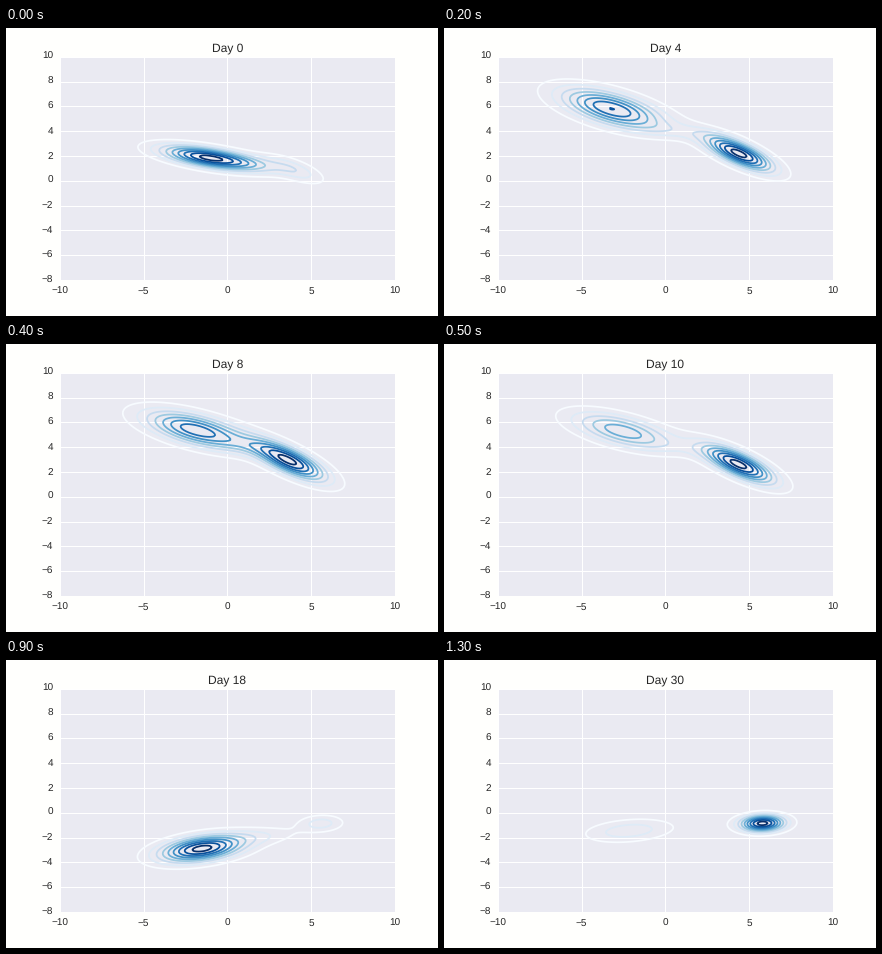
A matplotlib script for the animation above (1400 ms loop, 432 by 288 pixels).

```python
import matplotlib.pyplot as plt
import numpy as np
from matplotlib.animation import FuncAnimation

plt.rcParams.update({
    "font.family": "Liberation Sans",
    "text.color": "0.15",
    "text.hinting": "none",
    "xtick.labelcolor": "0.15",
    "ytick.labelcolor": "0.15",
    "ytick.alignment": "center",
})

INTERVAL = 100
DAYS = [*range(0, 24, 2), 26, 30]
LEVELS = np.linspace(0.105, 0.95, 9)

# Key poses: where the two clouds are, and how high east stands against west
KEY_STEPS = [0, 2, 4, 7, 9, 11, 13]
WEST_PATH = [(-1.1, 1.85), (-3.2, 5.8), (-1.9, 5.4), (-3.9, 5.1),
             (-1.55, -2.9), (-2.65, -2.9), (-2.2, -1.45)]
EAST_PATH = [(4.0, 0.9), (4.4, 2.2), (3.7, 2.9), (5.75, 2.05),
             (5.6, -0.85), (5.6, -1.4), (5.8, -0.85)]
BALANCE = [0.27, 1.18, 1.2, 3.2, 0.26, 0.42, 3.6]

X, Y = np.meshgrid(np.linspace(-10, 10, 180), np.linspace(-8, 10, 180))


def along(step, path):
    return np.array([np.interp(step, KEY_STEPS, axis) for axis in zip(*path)])


def tilt(y):
    """Clouds lean down to the right above zero and up to the right below."""
    return -0.1 - 0.5 * np.tanh(y + 0.5)


def bump(center, width, height, rho):
    u, v = (X - center[0]) / width, (Y - center[1]) / height
    q = (u * u - 2 * rho * u * v + v * v) / (1 - rho * rho)
    return 0.85 * np.exp(-q / 2) + 0.15 * np.exp(-q / 4)


def density(step):
    west, east = along(step, WEST_PATH), along(step, EAST_PATH)
    ratio = np.exp(np.interp(step, KEY_STEPS, np.log(BALANCE)))
    west_peak, east_peak = min(1, 1 / ratio), min(1, ratio)

    # Spreads follow the height of each cloud in the plane
    wx, wy = west
    ex, ey = east
    total = west_peak * bump(west, 1.8 + 0.04 * wx * 0 + 0.04 * wy,
                             0.6 + 0.015 * wy ** 2, tilt(wy))
    total += east_peak * bump(east, 1.03 + 0.15 * ey,
                              0.6 + 0.17 * ey, 1.25 * tilt(ey))

    # A faint bridge joins the clouds while the western one is strong
    middle = (west + east) / 2
    total += 0.15 * west_peak ** 2 * bump(middle, (ex - wx) / 4.5, 0.5, tilt(middle[1]))
    return total / total.max()


fig = plt.figure(figsize=(6, 4), dpi=72, facecolor="#FFFFFD")
ax = fig.add_axes([0.125, 0.125, 0.775, 0.775], facecolor="#EAEAF2")
ax.set(xlim=(-10, 10), ylim=(-8, 10),
       xticks=range(-10, 11, 5), yticks=range(-8, 11, 2))
ax.set_axisbelow(True)
ax.grid(color="white", linewidth=1)
ax.tick_params(length=0, pad=7, labelsize=10)
ax.spines[:].set_visible(False)
title = ax.set_title("", fontsize=12, pad=5)


def draw(step):
    for old in list(ax.collections):
        old.remove()
    ax.contour(X, Y, density(step), levels=LEVELS, cmap="Blues", linewidths=1.75)
    title.set_text(f"Day {DAYS[step]}")
    return [title]


anim = FuncAnimation(fig, draw, frames=len(DAYS), init_func=lambda: [title],
                     interval=INTERVAL, repeat=True, repeat_delay=0)
plt.show()
```
